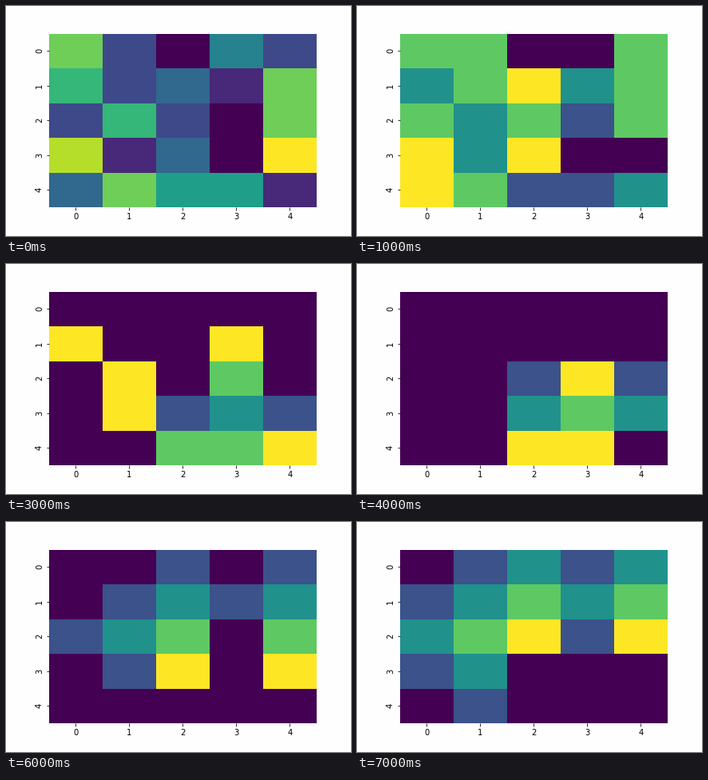
Recreate the animation shown at these times as a matplotlib script. Size 432x288 px, loop 8 s.

```python
import numpy as np
import matplotlib.pyplot as plt
from matplotlib.animation import FuncAnimation

SIZE = 5
STATES = 5
STEPS = 8

# Initial condition; every later grid follows from step().
START = np.array([
    [7, 2, 0, 4, 2],
    [6, 2, 3, 1, 7],
    [2, 6, 2, 0, 7],
    [8, 1, 3, 0, 9],
    [3, 7, 5, 5, 1],
])


def step(grid):
    """Excitable medium: a resting cell fires only beside a state-1 cell."""
    fired = np.pad(grid == 1, 1)
    near = fired[:-2, 1:-1] | fired[2:, 1:-1] | fired[1:-1, :-2] | fired[1:-1, 2:]
    return np.where(grid == 0, near.astype(int), (grid + 1) % STATES)


history = [START]
while len(history) < STEPS:
    history.append(step(history[-1]))

plt.rcParams.update({"font.family": "DejaVu Sans", "font.size": 10})
fig, ax = plt.subplots(figsize=(6, 4), dpi=72, facecolor="#fefefe")
fig.subplots_adjust(left=0.125, right=0.9, bottom=0.125, top=0.88)

mesh = ax.pcolormesh(START, cmap="viridis")
ax.set(xlim=(0, SIZE), ylim=(SIZE, 0))
ax.spines[:].set_visible(False)
centers = np.arange(SIZE) + 0.5
ax.set_xticks(centers, range(SIZE))
ax.set_yticks(centers, range(SIZE), rotation=90, va="center")


def draw(i):
    grid = history[i]
    mesh.set_array(grid)
    mesh.set_clim(grid.min(), grid.max())
    return [mesh]


anim = FuncAnimation(fig, draw, frames=STEPS, interval=1000,
                     repeat=True, repeat_delay=0)
plt.show()
```
